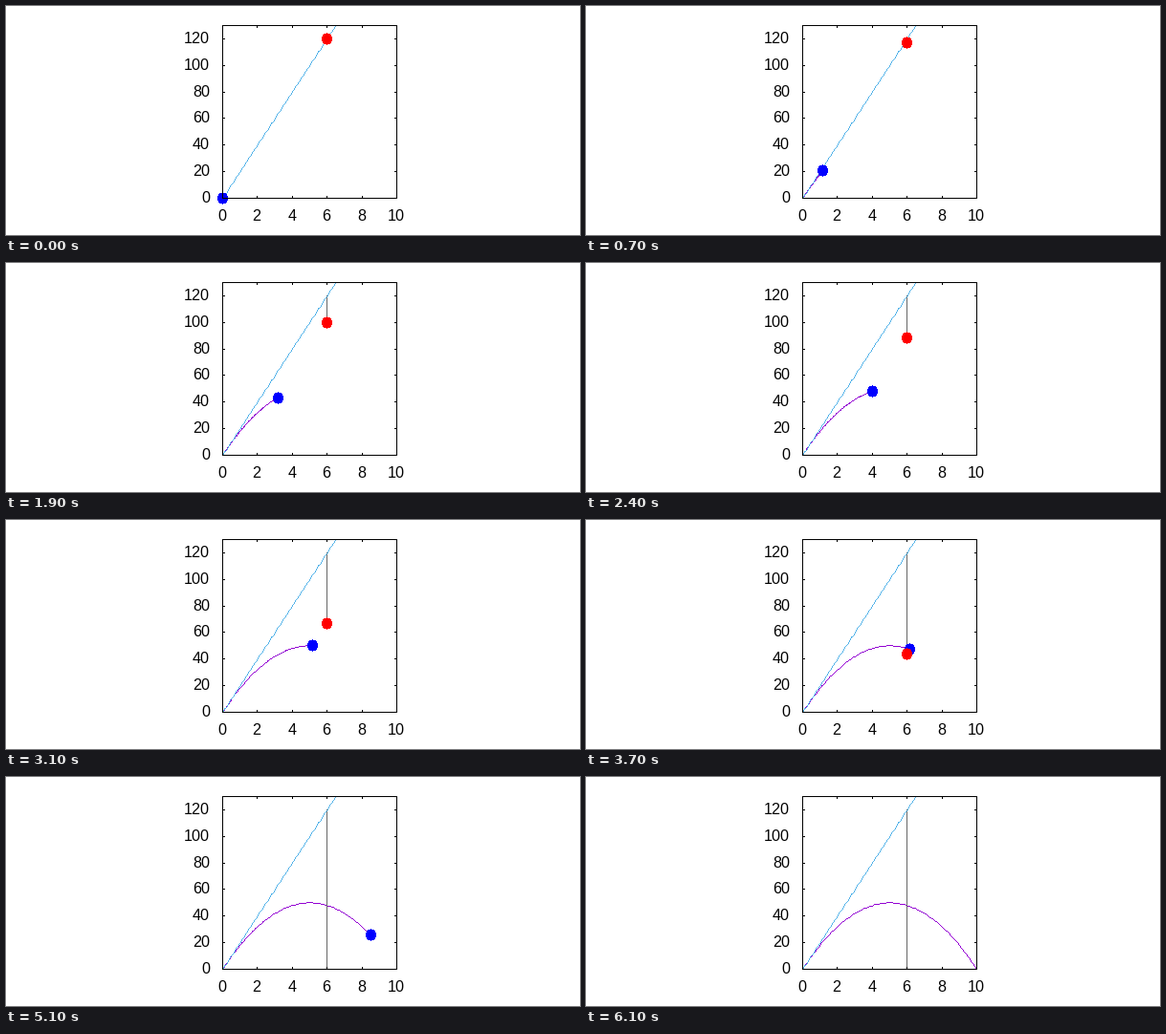
A matplotlib script for the animation above (8 s loop, 600 by 240 pixels).

```python
import numpy as np
import matplotlib.pyplot as plt
from matplotlib.animation import FuncAnimation
from matplotlib.patches import PathPatch
from matplotlib.path import Path

W, H, DPI = 600, 240, 100
LEFT, RIGHT, TOP, BOTTOM = 226, 408, 20, 201
X_MAX, Y_MAX = 10, 130
TICK = 2
TARGET_X, TARGET_Y = 6, 120
STEPS = 60          # steps until the projectile lands
SAMPLES = 100       # points per plotted curve

plt.rcParams["font.family"] = "Liberation Sans"
plt.rcParams["text.hinting"] = "default"
plt.rcParams["text.hinting_factor"] = 1
fig = plt.figure(figsize=(W / DPI, H / DPI), dpi=DPI, facecolor="white")
ax = fig.add_axes([0, 0, 1, 1])
ax.set_xlim(0, W)
ax.set_ylim(H, 0)
ax.axis("off")


def to_px(x, y):
    """Data coordinates to whole pixels."""
    px = LEFT + x * (RIGHT - LEFT) / X_MAX
    up = y * (BOTTOM - TOP) / Y_MAX
    return int(np.floor(px + 0.5)), BOTTOM - int(np.floor(up + 0.5))


def cell_path(cells):
    """Outline of unit squares, one for each pixel."""
    corners = np.array([[0, 0], [1, 0], [1, 1], [0, 1]])
    return Path.make_compound_path_from_polys(cells[:, None, :] + corners)


def segment(a, b):
    n = max(abs(b[0] - a[0]), abs(b[1] - a[1])) + 1
    xy = np.column_stack([np.linspace(a[0], b[0], n), np.linspace(a[1], b[1], n)])
    return np.floor(xy + 0.5)


def line_path(*points):
    parts = [segment(a, b) for a, b in zip(points, points[1:])]
    return cell_path(np.unique(np.vstack(parts), axis=0))


def curve_path(f, end):
    xs = np.linspace(0, end, SAMPLES)
    return line_path(*[to_px(x, f(x)) for x in xs])


def disc_path(x, y, rx=5.5, ry=6.1):
    dx, dy = np.meshgrid(np.arange(-6, 7), np.arange(-6, 7))
    inside = (dx / rx) ** 2 + (dy / ry) ** 2 <= 1
    cells = np.column_stack([dx[inside], dy[inside]])
    return cell_path(cells + np.array(to_px(x, y)))


def shape(color, z, path):
    patch = PathPatch(path, fc=color, lw=0, ec="none",
                      antialiased=False, snap=False, zorder=z)
    return ax.add_patch(patch)


def launch(x):
    return 20 * x


def height(x):
    return 20 * x - 2 * x * x


def draw_axes():
    def black(*points):
        shape("black", 9, line_path(*points))

    black((LEFT, TOP), (RIGHT, TOP), (RIGHT, BOTTOM), (LEFT, BOTTOM), (LEFT, TOP))
    font = dict(fontsize=16 * 72 / DPI, color="black", va="baseline")
    for v in range(0, X_MAX + 1, 2):
        x = to_px(v, 0)[0]
        black((x, BOTTOM), (x, BOTTOM - TICK))
        black((x, TOP), (x, TOP + TICK))
        ax.text(x, 225, str(v), ha="center", **font)
    for v in range(0, Y_MAX + 1, 20):
        y = to_px(0, v)[1]
        black((LEFT, y), (LEFT + TICK, y))
        black((RIGHT, y), (RIGHT - TICK, y))
        ax.text(213, y + 5, str(v), ha="right", **font)


draw_axes()
target = to_px(TARGET_X, TARGET_Y)
trail = shape("#9400d3", 2, curve_path(height, 0))
drop = shape("#666666", 3, line_path(target, target))
shape("#56b4e9", 4, curve_path(launch, Y_MAX / 20))
ball = shape("#0000ff", 5, disc_path(0, 0))
prey = shape("#ff0000", 6, disc_path(TARGET_X, TARGET_Y))


def update(i):
    x = min(i, STEPS) / 6
    fall = TARGET_Y - 2 * x * x

    trail.set_path(curve_path(height, x))
    drop.set_path(line_path(target, to_px(TARGET_X, max(fall, 0))))
    ball.set_path(disc_path(x, height(x)))
    ball.set_visible(i <= STEPS)
    prey.set_path(disc_path(TARGET_X, fall))
    prey.set_visible(fall >= 0)
    return trail, drop, ball, prey


anim = FuncAnimation(fig, update, frames=80, interval=100, repeat=True,
                     repeat_delay=0, blit=False)
plt.show()
```
